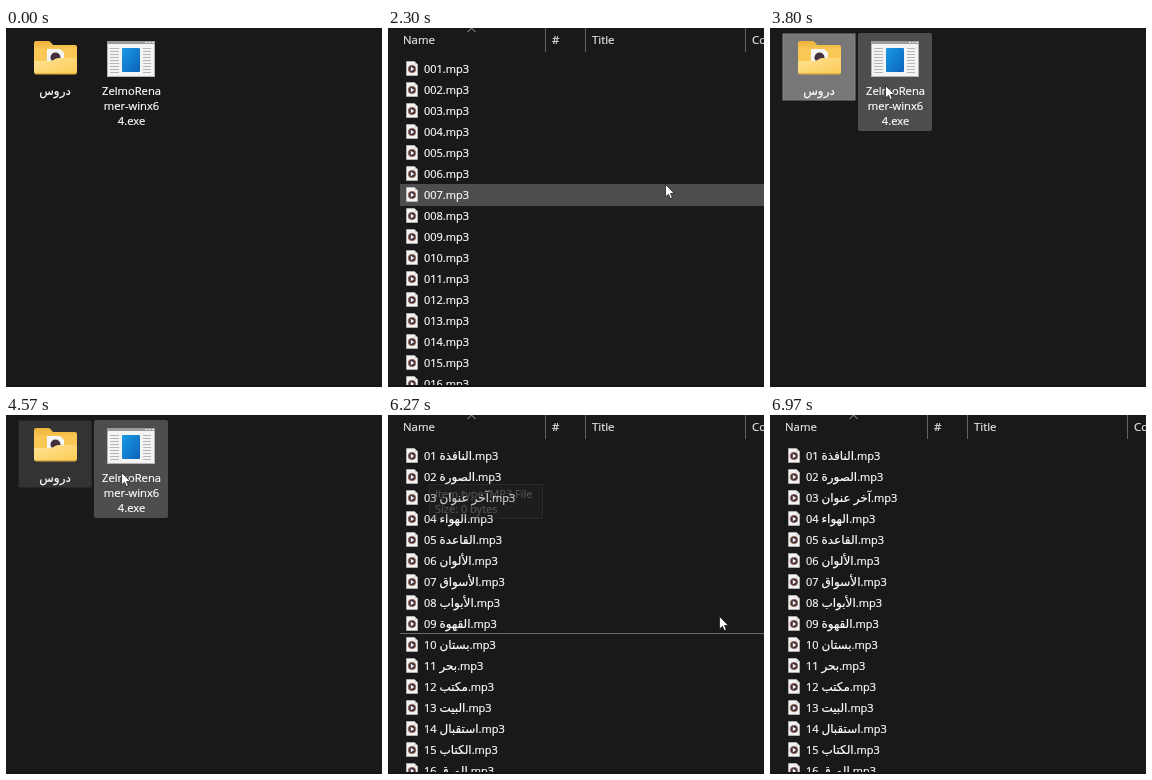
An HTML page that plays this animation: 376x359 px, repeating every 7040 ms.

```html
<!DOCTYPE html>
<html lang="en">
<head>
<meta charset="utf-8">
<title>Batch rename demo</title>
<style>
  html, body { margin: 0; width: 100%; height: 100%; overflow: hidden; background: #191919; }
  svg { display: block; width: 100%; height: 100%; }
  text { font: 11px "Open Sans", "Noto Sans", "DejaVu Sans", sans-serif; fill: #fff; stroke: #fff; stroke-width: .2px; }
  .arabic { font-size: 12px; }
  .head text { font-size: 11.4px; fill: #e6e6e6; stroke: #e6e6e6; }
  .mid text { font-size: 11.2px; text-anchor: middle; }
</style>
</head>
<body>
<svg viewBox="0 0 376 359" xmlns="http://www.w3.org/2000/svg">
  <defs>
    <linearGradient id="back" x2="0" y2="1">
      <stop offset="0" stop-color="#ecb23c"/><stop offset=".35" stop-color="#fac955"/>
    </linearGradient>
    <linearGradient id="front" x2="1" y2="1">
      <stop offset="0" stop-color="#ffe394"/><stop offset="1" stop-color="#fbcb55"/>
    </linearGradient>
    <linearGradient id="blue" x2="1" y2="1">
      <stop offset="0" stop-color="#1b9ae6"/><stop offset="1" stop-color="#0b62ba"/>
    </linearGradient>
    <g id="song">
      <path d="M.5 .5H8.5L11.5 3.5V14.5H.5Z" fill="#f4f4f4" stroke="#c9c9c9" stroke-width=".6"/>
      <path d="M8.5 .5V3.5H11.5" fill="#cfcfcf"/>
      <circle cx="6" cy="8" r="3.800" fill="#43303c" stroke="#a5785f" stroke-width=".7"/>
      <path d="M4.8 5.8L8.2 8L4.8 10.2Z" fill="#fff"/>
    </g>
    <g id="folder">
      <path d="M28 15Q28 13 30 13H42Q43.500 13 44.500 14L47 17H69Q71 17 71 19V40H28Z" fill="url(#back)"/>
      <path d="M41 21H54L58 25V38H41Z" fill="#f5f5f5"/>
      <circle cx="49.500" cy="29.500" r="5" fill="#43303c"/>
      <path d="M28 33H44Q46 33 47.500 32L50 30.500Q51 30 52.500 30H69Q71 30 71 32V44Q71 46 69 46H30Q28 46 28 44Z" fill="url(#front)"/>
      <path d="M28.500 45Q29 46.500 30.500 46.500H68.500Q70 46.500 70.500 45Z" fill="#e6b043"/>
    </g>
  </defs>
  <rect width="376" height="359" fill="#191919"/>

  <g id="desk" class="mid">
    <rect id="folderBox" x="13" y="6" width="72" height="66" stroke-width="1"/>
    <rect id="exeBox" x="88" y="5" width="74" height="98" rx="2" fill="#4d4d4d"/>
    <use href="#folder"/>
    <text x="49" y="67"><tspan class="arabic">دروس</tspan></text>
    <g id="exeIcon"></g>
    <text x="125.500" y="67">ZelmoRena</text>
    <text x="125.500" y="82">mer-winx6</text>
    <text x="125.500" y="97">4.exe</text>
  </g>

  <g id="head" class="head">
    <path d="M157.500 0V24M197.500 0V24M357.500 0V24" stroke="#636363"/>
    <path d="M79.500 4L83.500 0L87.500 4" fill="none" stroke="#a8a8a8"/>
    <text x="15" y="16">Name</text>
    <text x="164" y="16">#</text>
    <text x="204" y="16">Title</text>
    <text x="364" y="16">Comment</text>
  </g>
  <rect id="rowBox" x="12" width="364" height="22" fill="#4d4d4d"/>
  <g id="before"></g>
  <g id="after"></g>
  <path id="edge" d="M12 218.500H376" stroke="#6b6b6b"/>

  <g id="tip">
    <rect x="41.500" y="69.500" width="113" height="34" fill="#2b2b2b" stroke="#606060"/>
    <text x="47" y="83">Item type: MP3 File</text>
    <text x="47" y="98">Size: 0 bytes</text>
  </g>

  <g id="drag">
    <use href="#folder" opacity=".6"/>
    <g id="hint">
      <rect x="36.500" y="119.500" width="185" height="21" fill="#2b2b2b" stroke="#606060"/>
      <path d="M41 130H50M46.500 126.500L50 130L46.500 133.500" fill="none" stroke="#4aa3e8" stroke-width="1.500"/>
      <text x="55" y="134" style="font-size:10px">Open with ZelmoRenamer-winx64</text>
    </g>
  </g>

  <rect id="shell" y="36" width="376" height="323" fill="#0c0c0c"/>
  <rect y="357" width="376" height="2" fill="#151515"/>
  <path id="cursor" d="M.5 .5V13L3.500 10.300L5.300 14.500L7.300 13.600L5.500 9.500H9.300Z" fill="#fff" stroke="#111" stroke-width=".7"/>
</svg>
<script>
const LOOP = 7040, ROW = 21, TOP = 30;
const $ = id => document.getElementById(id);
const show = (id, on) => $(id).setAttribute('display', on ? 'inline' : 'none');
const fade = (id, a) => { show(id, a > 0); $(id).setAttribute('opacity', a); };
const within = (t, a, b) => t >= a && t < b;
const ramp = (t, a, b) => Math.min(1, Math.max(0, (t - a) / (b - a)));

const titles = ['النافذة', 'الصورة', 'آخر عنوان', 'الهواء', 'القاعدة', 'الألوان', 'الأسواق', 'الأبواب',
  'القهوة', 'بستان', 'بحر', 'مكتب', 'البيت', 'استقبال', 'الكتاب', 'الورق'];
const pad = (n, len) => String(n).padStart(len, '0');

function list(id, label) {
  $(id).innerHTML = titles.map((title, i) => {
    const y = TOP + i * ROW;
    return `<use href="#song" x="18" y="${y + 3}"/><text x="36" y="${y + 15}">${label(title, i + 1)}.mp3</text>`;
  }).join('');
}
list('before', (title, n) => pad(n, 3));
list('after', (title, n) => `${pad(n, 2)} <tspan class="arabic">${title}</tspan>`);

let lines = '';
for (let y = 20.5; y < 45; y += 3) lines += `M104 ${y}H113M137 ${y}H145`;
$('exeIcon').innerHTML = `
  <rect x="101.500" y="13.500" width="47" height="35" fill="#f4f4f4" stroke="#b4b4b4"/>
  <rect x="101" y="13" width="48" height="3" fill="#9c9c9c"/>
  <path d="M139 14.500H141M142.500 14.500H144.500M146 14.500H148" stroke="#eee"/>
  <path d="${lines}" stroke="#b5b5b5"/>
  <rect x="116" y="20" width="18" height="24" rx="1" fill="url(#blue)"/>`;

// Pointer path: time, x, y
const path = [
  [470, 373, 126], [700, 165, 72], [900, 46, 40], [1270, 46, 40],
  [1530, 24, 107], [1720, 110, 185], [1970, 300, 205], [2300, 277, 156], [2530, 277, 156],
  [2780, 110, -25], [2950, 110, -25], [3150, 46, 40], [3270, 46, 40],
  [3700, 115, 57], [4900, 115, 57], [5200, 54, 48], [5670, 54, 48],
  [5880, 42, 49], [6050, 130, 105], [6270, 330, 201], [6400, 345, 187], [6930, 378, 84], [7040, 378, 84]
];

function slope(i, k) {
  const a = path[i - 1], b = path[i], c = path[i + 1];
  if (!a || !c || (b[k] - a[k]) * (c[k] - b[k]) <= 0) return 0;
  return (c[k] - a[k]) / (c[0] - a[0]);
}

function pointer(t) {
  let i = 0;
  while (i < path.length - 2 && t >= path[i + 1][0]) i++;
  const a = path[i], b = path[i + 1], span = b[0] - a[0], u = ramp(t, a[0], b[0]);
  return [1, 2].map(k =>
    a[k] + (b[k] - a[k]) * u * u * (3 - 2 * u) +
    span * (slope(i, k) * u * (1 - u) ** 2 - slope(i + 1, k) * u * u * (1 - u)));
}

function folderFill(t, hover) {
  if (within(t, 870, 1130) || within(t, 2920, 4230) || t >= 5170) return ['#777', '#858585'];
  if (within(t, 4230, 4300)) return ['#555', '#606060'];
  if (hover) return ['#4d4d4d', '#4d4d4d'];
  return within(t, 4300, 5100) ? ['#333', '#333'] : ['none', 'none'];
}

function draw(t) {
  const [x, y] = pointer(t);
  const over = (x0, x1, y1) => t >= 470 && x >= x0 && x < x1 && y >= 5 && y < y1;

  show('desk', t < 1130 || within(t, 2920, 5530));
  show('head', within(t, 1270, 2920) || t >= 5530);
  show('before', within(t, 1270, 2920));
  show('after', t >= 5670);

  const [fill, stroke] = folderFill(t, over(13, 86, 73));
  $('folderBox').setAttribute('fill', fill);
  $('folderBox').setAttribute('stroke', stroke);
  const shellOn = within(t, 4500, 4570);
  show('exeBox', over(88, 162, 103) && !shellOn);
  fade('shell', shellOn ? (t < 4535 ? 0.6 : 1) : 0);

  const row = Math.floor((y + 0.5 - TOP) / ROW);
  const hot = within(t, 1970, 2660) || within(t, 5670, 5980) || within(t, 6400, 6970);
  show('rowBox', hot && row >= 0);
  $('rowBox').setAttribute('y', TOP + row * ROW);
  show('edge', within(t, 6250, 6305));

  fade('tip', ramp(t, 5740, 5900) * (1 - ramp(t, 6130, 6315)));
  fade('drag', within(t, 3300, 3790) ? 1 - ramp(t, 3680, 3790) : 0);
  $('drag').setAttribute('transform', `translate(${x - 46} ${y - 40})`);
  show('hint', x > 88);

  show('cursor', within(t, 470, 6970));
  $('cursor').setAttribute('transform', `translate(${Math.round(x)} ${Math.round(y)})`);
}

const start = performance.now();
function tick() {
  draw((performance.now() - start) % LOOP);
  requestAnimationFrame(tick);
}
tick();
</script>
</body>
</html>
```
